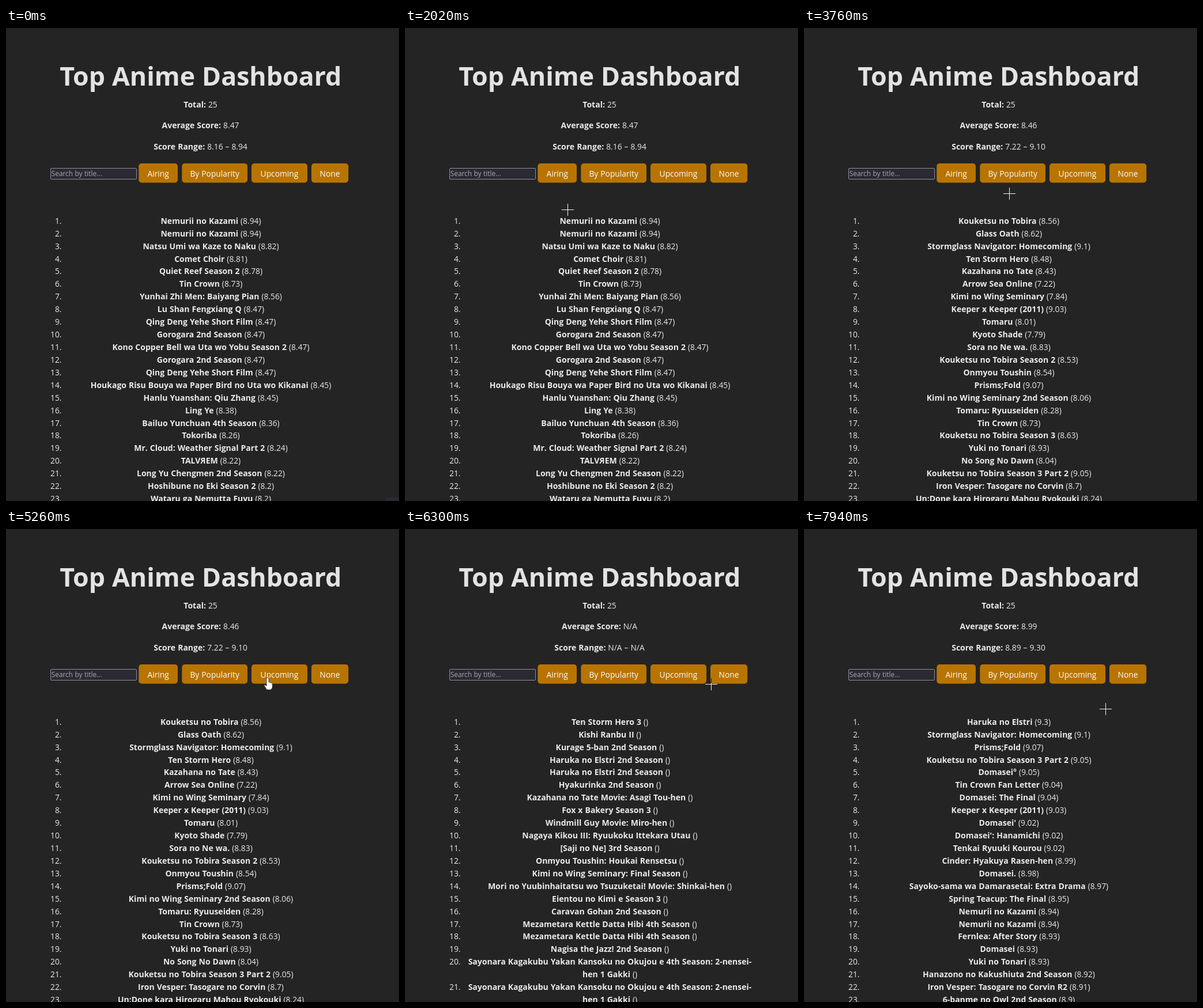
Recreate the animation shown at these times as an HTML page. Size 682 by 821 pixels, loop 8000 ms.

```html
<!DOCTYPE html>
<html lang="en">
<head>
<meta charset="utf-8">
<title>Top Anime Dashboard</title>
<style>
  html, body { margin: 0; width: 100%; height: 100%; overflow: hidden; background: #242424; }
  svg { display: block; width: 682px; height: 821px; }
  text { font: 13.8px "Open Sans", "Noto Sans", sans-serif; word-spacing: .4px; fill: #ebebeb; text-anchor: middle; }
  .b { font-size: 14px; font-weight: 700; }
  .title { font-size: 44.7px; font-weight: 700; fill: #e3e3e3; }
  .num { text-anchor: end; }
  .hint { font-size: 11.9px; fill: #a9a7b3; text-anchor: start; }
  .label { fill: #fff; }
  .button { fill: #b87400; }
  .cross { fill: none; stroke: #f4f4f4; shape-rendering: crispEdges; }
  .dark { stroke: #141414; }
</style>
</head>
<body>
<svg id="stage" viewBox="0 0 682 821">
  <defs><clipPath id="clip"></clipPath></defs>
  <rect width="682" height="821" fill="#242424"/>
  <text class="title" x="337.8" y="100">Top Anime Dashboard</text>
  <rect x="77.5" y="243.5" width="149" height="19" rx="1.5" fill="#2b2a33" stroke="#8f8f9d"/>
  <text class="hint" x="78.7" y="257.3">Search by title...</text>
  <g id="buttons"></g>
  <g id="pages"></g>
  <rect id="corner" x="659" y="815" width="23" height="6" fill="#2b2a33"/>
  <path class="cross" d="M-10 .5H11M.5 -10V11"/>
  <g clip-path="url(#clip)"><path class="cross dark" d="M-10 .5H11M.5 -10V11"/></g>
  <path id="hand" fill="#fff" stroke="#222" stroke-width=".8" d="M-2 2Q-2 0 0 0Q2 0 2 2V8Q4 7 4.6 8.6Q6 8 6.6 9.4Q8.4 9 8.4 11V15Q8.4 18 6.4 20V21H-2V20L-5.6 14.5Q-6.4 12.2 -4.4 12.6L-2 14.6Z"/>
</svg>
<script>
const LOOP = 8000;
const $ = id => document.getElementById(id);

// x, width, label
const buttons = [[230.3, 67.7, "Airing"], [305.3, 113.7, "By Popularity"],
                 [426, 97, "Upcoming"], [530, 64.2, "None"]];

// Rows are "title|score"; a row starting with ">" continues the one above.
const pages = [
  { from: 0, avg: "8.47", range: "8.16 – 8.94", rows: `Nemurii no Kazami|8.94
Nemurii no Kazami|8.94
Natsu Umi wa Kaze to Naku|8.82
Comet Choir|8.81
Quiet Reef Season 2|8.78
Tin Crown|8.73
Yunhai Zhi Men: Baiyang Pian|8.56
Lu Shan Fengxiang Q|8.47
Qing Deng Yehe Short Film|8.47
Gorogara 2nd Season|8.47
Kono Copper Bell wa Uta wo Yobu Season 2|8.47
Gorogara 2nd Season|8.47
Qing Deng Yehe Short Film|8.47
Houkago Risu Bouya wa Paper Bird no Uta wo Kikanai|8.45
Hanlu Yuanshan: Qiu Zhang|8.45
Ling Ye|8.38
Bailuo Yunchuan 4th Season|8.36
Tokoriba|8.26
Mr. Cloud: Weather Signal Part 2|8.24
TALVЯEM|8.22
Long Yu Chengmen 2nd Season|8.22
Hoshibune no Eki Season 2|8.2
Wataru ga Nemutta Fuyu|8.2` },
  { from: 3550, avg: "8.46", range: "7.22 – 9.10", rows: `Kouketsu no Tobira|8.56
Glass Oath|8.62
Stormglass Navigator: Homecoming|9.1
Ten Storm Hero|8.48
Kazahana no Tate|8.43
Arrow Sea Online|7.22
Kimi no Wing Seminary|7.84
Keeper x Keeper (2011)|9.03
Tomaru|8.01
Kyoto Shade|7.79
Sora no Ne wa.|8.83
Kouketsu no Tobira Season 2|8.53
Onmyou Toushin|8.54
Prisms;Fold|9.07
Kimi no Wing Seminary 2nd Season|8.06
Tomaru: Ryuuseiden|8.28
Tin Crown|8.73
Kouketsu no Tobira Season 3|8.63
Yuki no Tonari|8.93
No Song No Dawn|8.04
Kouketsu no Tobira Season 3 Part 2|9.05
Iron Vesper: Tasogare no Corvin|8.7
Un:Done kara Hirogaru Mahou Ryokouki|8.24` },
  { from: 5390, avg: "N/A", range: "N/A – N/A", rows: `Ten Storm Hero 3|
Kishi Ranbu II|
Kurage 5-ban 2nd Season|
Haruka no Elstri 2nd Season|
Haruka no Elstri 2nd Season|
Hyakurinka 2nd Season|
Kazahana no Tate Movie: Asagi Tou-hen|
Fox x Bakery Season 3|
Windmill Guy Movie: Miro-hen|
Nagaya Kikou III: Ryuukoku Ittekara Utau|
[Saji no Ne] 3rd Season|
Onmyou Toushin: Houkai Rensetsu|
Kimi no Wing Seminary: Final Season|
Mori no Yuubinhaitatsu wo Tsuzuketai! Movie: Shinkai-hen|
Eientou no Kimi e Season 3|
Caravan Gohan 2nd Season|
Mezametara Kettle Datta Hibi 4th Season|
Mezametara Kettle Datta Hibi 4th Season|
Nagisa the Jazz! 2nd Season|
Sayonara Kagakubu Yakan Kansoku no Okujou e 4th Season: 2-nensei-
>hen 1 Gakki|
Sayonara Kagakubu Yakan Kansoku no Okujou e 4th Season: 2-nensei-
>hen 1 Gakki|` },
  { from: 7380, avg: "8.99", range: "8.89 – 9.30", rows: `Haruka no Elstri|9.3
Stormglass Navigator: Homecoming|9.1
Prisms;Fold|9.07
Kouketsu no Tobira Season 3 Part 2|9.05
Domasei°|9.05
Tin Crown Fan Letter|9.04
Domasei: The Final|9.04
Keeper x Keeper (2011)|9.03
Domasei'|9.02
Domasei': Hanamichi|9.02
Tenkai Ryuuki Kourou|9.02
Cinder: Hyakuya Rasen-hen|8.99
Domasei.|8.98
Sayoko-sama wa Damarasetai: Extra Drama|8.97
Spring Teacup: The Final|8.95
Nemurii no Kazami|8.94
Nemurii no Kazami|8.94
Fernlea: After Story|8.93
Domasei|8.93
Yuki no Tonari|8.93
Hanazono no Kakushiuta 2nd Season|8.92
Iron Vesper: Tasogare no Corvin R2|8.91
6-banme no Owl 2nd Season|8.9` }
];

// time, x, y of the pointer's hot spot
const path = [
  [70, 672, 811], [300, 540, 620], [520, 380, 410], [700, 284, 300], [870, 244, 258],
  [1080, 246, 256], [1550, 246, 255], [1690, 250, 290], [1880, 264, 324], [2020, 282, 315],
  [2150, 312, 290], [2290, 348, 265], [3550, 348, 265], [3760, 356, 287], [4000, 384, 298],
  [4310, 421, 291], [4480, 440, 274], [4660, 454, 258], [5390, 454, 258], [5620, 466, 292],
  [5950, 483, 294], [6300, 531, 269], [6640, 543, 260], [7380, 543, 260], [7600, 538, 288],
  [7940, 523, 312]
];
// spans in which a held button shows the cross instead of the hand
const presses = [[1410, 1550], [3220, 3350], [5190, 5260], [7040, 7110]];

const bold = s => `<tspan class="b">${s}</tspan>`;
const text = (x, y, s, cls = "") => `<text class="${cls}" x="${x}" y="${y}">${s}</text>`;
const box = ([x, w]) => `<rect class="button" x="${x}" y="235" width="${w}" height="33.5" rx="5"/>`;

function pageMarkup({ avg, range, rows }) {
  let n = 0;
  const stats = [["Total", 25], ["Average Score", avg], ["Score Range", range]]
    .map(([k, v], i) => text(337.5, 137.7 + 36.6 * i, `${bold(k + ":")} ${v}`));
  const list = rows.split("\n").map((row, i) => {
    const [title, score] = row.replace(/^>/, "").split("|");
    const y = 339.8 + 21.92 * i;
    const line = bold(title) + (score === undefined ? "" : ` (${score})`);
    return (row[0] === ">" ? "" : text(96.5, y, ++n + ".", "num")) + text(355.5, y, line);
  });
  return `<g>${stats.join("")}${list.join("")}</g>`;
}

$("clip").innerHTML = buttons.map(box).join("");
$("buttons").innerHTML = buttons.map(b => box(b) + text(b[0] + b[1] / 2, 257.8, b[2], "label")).join("");
$("pages").innerHTML = pages.map(pageMarkup).join("");
const groups = [...$("pages").children];
const crosses = document.querySelectorAll(".cross");

function pointerAt(t) {
  const i = path.findIndex(p => p[0] > t);
  if (i < 0) return path[path.length - 1].slice(1);
  const [t0, x0, y0] = path[i - 1], [t1, x1, y1] = path[i];
  const k = (t - t0) / (t1 - t0);
  return [x0 + (x1 - x0) * k, y0 + (y1 - y0) * k].map(Math.round);
}

const show = (el, on) => { el.style.display = on ? "" : "none"; };

function draw(t) {
  const page = pages.filter(p => p.from <= t).length - 1;
  groups.forEach((g, i) => show(g, i === page));
  show($("corner"), t < 70);

  const visible = t >= 70;
  const [x, y] = visible ? pointerAt(t) : [0, 0];
  const over = y >= 235 && y <= 268 && buttons.some(([bx, w]) => x >= bx && x <= bx + w);
  const pressed = presses.some(([a, b]) => t >= a && t < b);
  const hand = over && !pressed;
  const move = `translate(${x} ${y})`;
  $("hand").setAttribute("transform", move);
  show($("hand"), visible && hand);
  crosses.forEach(c => {
    c.setAttribute("transform", move);
    show(c, visible && !hand);
  });
}

const start = performance.now();
function tick() {
  draw((performance.now() - start) % LOOP);
  requestAnimationFrame(tick);
}
tick();
</script>
</body>
</html>
```
